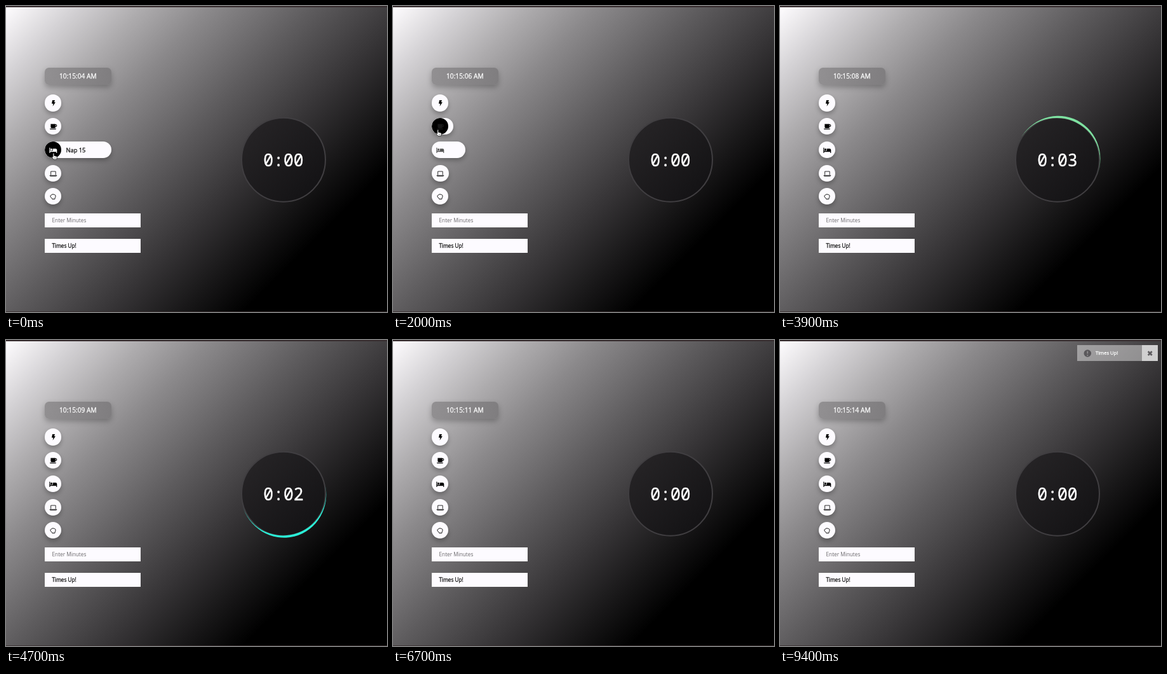
Recreate the animation shown at these times as an HTML page. Size 600 by 481 pixels, loop 9.7 s.

```html
<!DOCTYPE html>
<html lang="en">
<head>
<meta charset="utf-8">
<title>Break timer</title>
<style>
html, body { margin: 0; width: 100%; height: 100%; overflow: hidden; background: #000; }
* { box-sizing: border-box; }
#stage {
  position: relative; width: 600px; height: 481px; overflow: hidden;
  font-family: "Open Sans", "Noto Sans", sans-serif; white-space: nowrap;
  background: linear-gradient(135deg, #fffdff 0, #d5d3d6 10%, #aeacae 20%, #8b898b 30%,
    #5e5c5e 45%, #343234 60%, #181718 70%, #000 79%);
}
#stage > * { position: absolute; }
.edge { left: 0; width: 600px; height: 2px; background: #372d2f; }
#clock, .pill span, .field { -webkit-text-stroke: .28px; }
#clock {
  left: 61.2px; top: 97px; width: 105px; height: 26.5px; padding-left: 22.8px; border-radius: 6.5px;
  font-size: 10.2px; line-height: 27px; color: #fff;
  background: linear-gradient(100deg, #929092, #7f7d7f);
  box-shadow: 0 4px 8px rgba(0, 0, 0, .25);
}
.pill {
  left: 61.3px; height: 26.2px; border-radius: 14px; overflow: hidden;
  background: #fdfbff; box-shadow: 0 4px 7px rgba(0, 0, 0, .27);
}
.pill svg { position: absolute; left: 0; top: 0; border-radius: 50%; }
.pill span { position: absolute; left: 33.2px; top: 0; font-size: 9.3px; line-height: 27px; color: #111; }
.field {
  left: 61.2px; width: 151px; height: 22.2px; padding-left: 11.3px;
  font-size: 8.25px; line-height: 22.5px; color: #111; background: #fdfbff;
}
.field.hint { color: #6a686b; -webkit-text-stroke: 0; }
#dial { left: 0; top: 0; }
#left {
  left: 362px; top: 221px; width: 150px; text-align: center; color: #fff;
  font: 400 26.4px/42px "Noto Sans Mono", "DejaVu Sans Mono", monospace;
  -webkit-text-stroke: .4px;
}
#toast { left: 473px; top: 7.5px; width: 127px; height: 25.5px; background: rgba(255, 255, 255, .42); }
#toast b {
  position: absolute; left: 29px; top: 0; font-size: 7.6px; line-height: 25px;
  font-weight: 400; color: #fff; -webkit-text-stroke: .28px;
}
#toast svg { position: absolute; left: 0; top: 0; }
#hand { left: 0; top: 0; }
</style>
</head>
<body>
<div id="stage">
  <div class="edge" style="top:0"></div>
  <div class="edge" style="top:480px;opacity:.8"></div>
  <div id="clock"></div>
  <div class="field hint" style="top:326.3px">Enter Minutes</div>
  <div class="field" style="top:365.8px">Times Up!</div>
  <svg id="dial" width="600" height="481">
    <defs>
      <linearGradient id="glass" x1="0" y1="0" x2="1" y2="1">
        <stop offset=".1" stop-color="#262426"/>
        <stop offset=".9" stop-color="#131214"/>
      </linearGradient>
    </defs>
    <g transform="translate(437 241.7)">
      <circle r="66" fill="url(#glass)" stroke="#403e41" stroke-width="2"/>
      <path id="arc" d="M-67.2 0A67.2 69.2 0 0 0 67.2 0A67 65.4 0 0 1 -67.2 0Z"/>
    </g>
  </svg>
  <div id="left"></div>
  <div id="toast">
    <svg width="127" height="25.5">
      <path d="M102 0h25v25.5h-25z" fill="#fff" fill-opacity=".58"/>
      <circle cx="16.3" cy="13" r="5.8" fill="#5a585b"/>
      <path d="M16.3 9.6v4M16.3 15.3v1.6" stroke="#918f92" stroke-width="1.7"/>
      <path d="M111.7 10l6 6m0-6l-6 6" stroke="#5f5d60" stroke-width="2.7"/>
    </svg>
    <b>Times Up!</b>
  </div>
  <svg id="hand" width="12" height="13">
    <path d="M3 1.4q0-1 .9-1t.9 1v3l3.6.8q1.2.4 1 1.7l-.7 3.4H4.2L1.2 6.8q-.2-1 .7-1l1.1.7z"
      fill="#fff" stroke="#222" stroke-width=".8"/>
    <path d="M5.6 7v2M7 7v2" stroke="#444" stroke-width=".5"/>
  </svg>
</div>
<script>
const LOOP = 9700, STEP = 100, START = 2780, DONE = 6700;
const $ = id => document.getElementById(id);

// Icons sit in a 27 px square; spans are the times the pointer is over an item.
const items = [
  { label: 'Bolt 3s', spans: [[2300, 2965]],
    icon: '<path d="M12 8.5h4.2l-1.3 3.6h2.3l-4.7 7 .9-4.6h-2.7z" fill="currentColor"/>' },
  { label: 'Tea 5', spans: [[1950, 2200]],
    icon: '<path d="M9 9h8.2v5.4q0 1.6-1.6 1.6h-5q-1.6 0-1.6-1.6zM7.3 17h11.2q-.4 1.3-1.4 1.3H8.7q-1 0-1.4-1.3z" fill="currentColor"/>' +
      '<path d="M17 10.2h.6a1.6 1.6 0 0 1 0 3.3H17" fill="none" stroke="currentColor" stroke-width="1.2"/>' },
  { label: 'Nap 15', spans: [[-900, 200], [1650, 1850]],
    icon: '<path d="M6.8 9.4h1.3v5h4.7v-3.6h4.6q2.4 0 2.4 2.2v5.2h-1.3v-1.8H8.1v1.8H6.8z" fill="currentColor"/>' +
      '<circle cx="10.4" cy="12.4" r="1.7" fill="currentColor"/>' },
  { label: 'Work 60', spans: [[300, 610], [1300, 1550]],
    icon: '<path d="M9.3 15.6v-6h8.2v6M7.5 16.4h11.8q0 1.2-1.1 1.2H8.6q-1.1 0-1.1-1.2z" fill="none" stroke="currentColor" stroke-width=".9"/>' },
  { label: 'Stop', spans: [[815, 1200]],
    icon: '<path d="M8.6 12.3q.2-1.2 1.6-1.3l1-1.3 1.6-.1 1.6.2 1.5.5 1.2.9.3 2-.9 2.3-.4 2.2h-4.6l-.4-1.3-2.3-2.2z" fill="none" stroke="currentColor" stroke-width="1"/>' }
];
items.forEach((item, i) => {
  const pill = document.createElement('div');
  pill.className = 'pill';
  pill.style.top = 139.4 + i * 36.7 + 'px';
  pill.innerHTML = `<svg width="26.2" height="26.2"><g transform="translate(1.1 1.2) scale(.92)">${item.icon}</g></svg>` +
    `<span>${item.label}</span>`;
  $('stage').insertBefore(pill, $('hand'));
  Object.assign(item, { pill, badge: pill.firstChild, text: pill.lastChild });
});

// pointer path: time, x, y
const path = [
  [0, 75, 236], [200, 74, 240], [300, 73, 249], [600, 70, 276], [800, 67, 287], [900, 66, 296],
  [1100, 67, 297], [1200, 68, 286], [1550, 68, 252], [1850, 70, 215], [2200, 72, 178],
  [2300, 73, 166], [2500, 74, 156], [2950, 74, 155]
];
// arc colour: turn fraction, r, g, b
const hues = [[0, 40, 240, 214], [.15, 42, 234, 190], [.55, 128, 226, 160], [.95, 42, 240, 216], [1, 40, 240, 214]];
// toast offset: fraction of its run, px
const slide = [[0, 127], [.4, -12.7], [.8, 0], [1, -5]];

const clamp = v => Math.min(1, Math.max(0, v));

// the CSS "ease" curve
function ease(x) {
  x = clamp(x);
  let lo = 0, hi = 1;
  for (let i = 0; i < 20; i++) {
    const u = (lo + hi) / 2;
    if (.75 * u * (1 - u) + u ** 3 < x) lo = u; else hi = u;
  }
  return .3 * lo * (1 - lo) ** 2 + 3 * lo * lo * (1 - lo) + lo ** 3;
}

function along(table, at, curve = v => v) {
  let i = 1;
  while (i < table.length - 1 && table[i][0] < at) i++;
  const a = table[i - 1], b = table[i];
  const k = curve(clamp((at - a[0]) / (b[0] - a[0])));
  return a.slice(1).map((v, n) => v + (b[n + 1] - v) * k);
}

function openness(spans, t) {
  let from = 0, to = 0, since = -9000;
  const value = s => from + (to - from) * ease((s - since) / 500);
  spans.flat().forEach((s, i) => {
    if (s > t) return;
    from = value(s);
    to = i % 2 ? 0 : 1;
    since = s;
  });
  return value(t);
}

function draw(t) {
  const second = 4 + Math.floor((t + 600) / 1000);
  $('clock').textContent = `10:15:${String(second).padStart(2, '0')} AM`;

  const ticks = Math.floor((t - 3700) / 1000);
  $('left').textContent = '0:0' + (ticks < 0 ? 0 : Math.max(0, 3 - ticks));

  for (const { spans, pill, badge, text } of items) {
    const open = openness(spans, t);
    const over = spans.some(([a, b]) => t >= a && t < b);
    const tone = Math.round(255 * open);
    pill.style.width = 26.2 + 78.8 * open + 'px';
    badge.style.background = over ? '#000' : 'none';
    badge.style.color = `rgb(${tone},${tone},${tone})`;
    text.style.opacity = clamp((open - .35) * 7);
  }

  const turn = (t - START) / 2000;
  $('arc').style.display = t >= START && t < DONE ? '' : 'none';
  $('arc').setAttribute('transform', `rotate(${turn * 360})`);
  $('arc').setAttribute('fill', `rgb(${along(hues, turn - Math.floor(turn)).map(Math.round)})`);

  const run = (t - DONE) / 1000;
  $('toast').style.transform = `translateX(${along(slide, run, ease)[0]}px)`;

  const [x, y] = along(path, t);
  $('hand').style.display = t < 2950 ? '' : 'none';
  $('hand').style.transform = `translate(${x - 4}px,${y - 5}px)`;
}

const began = performance.now();
function frame() {
  const t = (performance.now() - began) % LOOP;
  draw(Math.floor(t / STEP) * STEP);
  requestAnimationFrame(frame);
}
draw(0);
requestAnimationFrame(frame);
</script>
</body>
</html>
```
